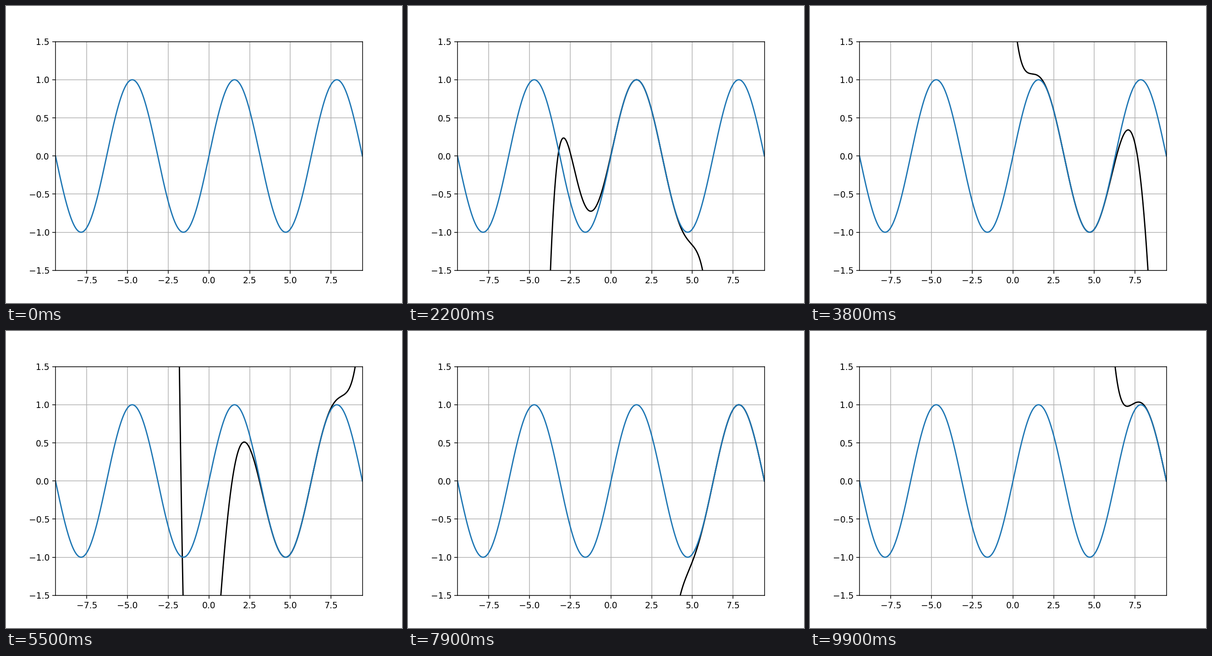
These frames come from a looping animation (864x648 px, 10000 ms). A matplotlib script:

```python
import numpy as np
import matplotlib.pyplot as plt
from matplotlib.animation import FuncAnimation

FRAMES = 100
INTERVAL = 100
STEP = 0.1      # shift of the expansion point per frame
DEGREE = 6

LIMIT = 3 * np.pi
x = np.linspace(-LIMIT, LIMIT, 1000)


def taylor_sin(x, c):
    """Taylor polynomial of sin around c."""
    d = x - c
    total = np.zeros_like(x)
    term = np.ones_like(x)
    for n in range(DEGREE + 1):
        total += np.sin(c + n * np.pi / 2) * term
        term = term * d / (n + 1)
    return total


fig, ax = plt.subplots(figsize=(6.4, 4.8), dpi=135)
ax.set_xlim(-LIMIT, LIMIT)
ax.set_ylim(-1.5, 1.5)
ax.grid(True)
approx, = ax.plot([], [], color="black")
ax.plot(x, np.sin(x), color="C0")


def update(i):
    # The loop opens on the sine curve alone.
    if i == 0:
        approx.set_data([], [])
    else:
        approx.set_data(x, taylor_sin(x, STEP * i))
    return approx,


anim = FuncAnimation(fig, update, frames=FRAMES, interval=INTERVAL,
                     repeat=True, repeat_delay=0)
plt.show()
```
